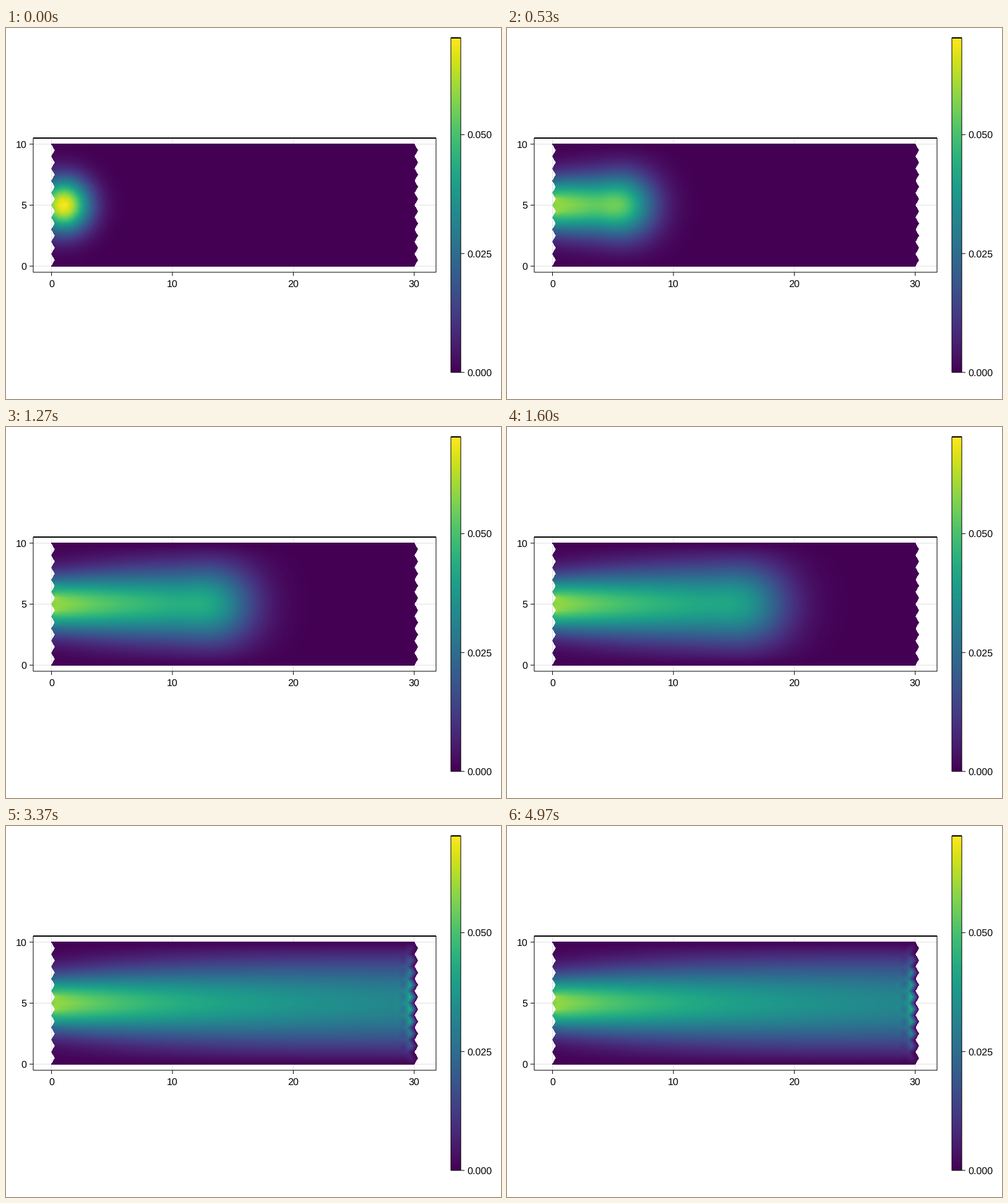
These frames come from a looping animation (800 px wide and 600 px high, 5.01 s). A matplotlib script:

```python
import numpy as np
import matplotlib.pyplot as plt
from matplotlib.animation import FuncAnimation

W, H, DPI = 800, 600, 100
FRAMES, LOOP_MS = 150, 5010
plt.rcParams["font.family"] = "Liberation Sans"
plt.rcParams["text.hinting"] = "none"

# Triangular mesh: odd rows are shifted right by half a cell
NX, NY = 52, 20
DX, DY = 30 / NX, 0.5
SPEED, DIFFUSION, SIGMA = 10.0, 1.0, 1.5

# Pixel layout
LEFT, RIGHT, TOP, BOTTOM = 44, 695, 178, 395
SX = (RIGHT - LEFT) / (1.1 * (30 + DX / 2))
SY = (BOTTOM - TOP) / 11
X0 = LEFT + 0.05 * (30 + DX / 2) * SX
Y0 = BOTTOM - 0.5 * SY
BAR_L, BAR_R, BAR_T, BAR_B = 719, 735, 16, 557
FIELD = (72, 668, 387, 186)


def start():
    j, i = np.mgrid[0:NY + 1, 0:NX + 1]
    x, y = (i + 0.5 * (j % 2)) * DX, j * DY
    r2 = (x - 1) ** 2 + (y - 5) ** 2
    return np.exp(-r2 / (2 * SIGMA ** 2)) / (2 * np.pi * SIGMA ** 2)


def rate(c):
    """Advection and diffusion on the hexagonal stencil, fixed boundary."""
    out = np.zeros_like(c)
    for p in (0, 1):
        first = 2 - p
        mid = c[first:NY:2]
        up, down = c[first + 1:NY + 1:2], c[first - 1:NY - 1:2]
        lo, hi = slice(p, p + NX - 1), slice(p + 1, p + NX)
        west, here, east = mid[:, :-2], mid[:, 1:-1], mid[:, 2:]
        nw, ne, sw, se = up[:, lo], up[:, hi], down[:, lo], down[:, hi]
        grad = (2 * (east - west) + ne - nw + se - sw) / (6 * DX)
        lap = (east + west + ne + nw + se + sw - 6 * here) / (1.5 * DX ** 2)
        out[first:NY:2, 1:-1] = DIFFUSION * lap - SPEED * grad
    return out


def solve(substeps=5):
    dt = LOOP_MS / 1000 / FRAMES / substeps
    c = start()
    states = [c]
    for _ in range(FRAMES - 1):
        for _ in range(substeps):
            k1 = rate(c)
            k2 = rate(c + dt / 2 * k1)
            k3 = rate(c + dt / 2 * k2)
            k4 = rate(c + dt * k3)
            c = c + dt / 6 * (k1 + 2 * k2 + 2 * k3 + k4)
        states.append(c)
    return np.array(states)


def add_flicker(states, amount=0.07):
    """Unsteady ripple in the last free nodes before the outlet."""
    rng = np.random.default_rng(4)
    half = rng.uniform(-amount, amount, (FRAMES, NY // 4))
    states[:, 1::2, NX - 1] *= 1 + np.hstack([half, half[:, ::-1]])


def sampler():
    """Node indices and weights of the triangle under each pixel."""
    x = (np.arange(FIELD[0], FIELD[1]) + 0.5 - X0) / SX
    y = (Y0 - np.arange(FIELD[3], FIELD[2]) - 0.5) / SY
    x, r = np.meshgrid(x, y / DY)
    # Pixels touched by the rim count as inside
    pad_r, pad_p = 0.5 / (SY * DY), 0.5 / (SX * DX)
    inside = (r >= -pad_r) & (r <= NY + pad_r)
    r = np.clip(r, 0, NY - 1e-9)
    even = 2 * ((r + 1) // 2).astype(int)
    odd = 2 * (r // 2).astype(int) + 1
    f = np.abs(r - even)
    p = x / DX - f / 2
    inside &= (p >= -pad_p) & (p <= NX + pad_p)
    p = np.clip(p, 0, NX - 1e-9)
    i = p.astype(int)
    g = p - i
    low = g + f <= 1
    nodes = [
        (np.where(low, even, odd), np.where(low, i, i + 1), np.abs(1 - g - f)),
        (even, i + 1, np.where(low, g, 1 - f)),
        (odd, i, np.where(low, f, 1 - g)),
    ]
    return nodes, ~inside


states = solve()
add_flicker(states)
VMAX = states[0].max()
nodes, outside = sampler()


def raster(n):
    c = states[n]
    return np.ma.array(sum(c[j, i] * w for j, i, w in nodes), mask=outside)


fig = plt.figure(figsize=(W / DPI, H / DPI), dpi=DPI, facecolor="white")
ax = fig.add_axes([0, 0, 1, 1])
ax.axis("off")


def line(xs, ys, color="black", z=4):
    ax.plot(xs, ys, color=color, lw=72 / DPI, zorder=z, snap=False,
            solid_capstyle="butt", solid_joinstyle="miter")


def box(l, r, t, b):
    line([l, r, r, l, l, r], [t, t, b, b, t, t])


def label(x, y, text, ha):
    ax.text(x, y + 5.7, text, ha=ha, va="baseline", fontsize=16 * 72 / DPI)


for v in (0, 10, 20, 30):
    x = X0 + v * SX
    line([x, x], [TOP, BOTTOM], "#e0e0e0", 1)
    line([x, x], [BOTTOM, BOTTOM + 6])
    label(x, 413.3, str(v), "center")
for v in (0, 5, 10):
    y = Y0 - v * SY
    line([LEFT, RIGHT], [y, y], "#e0e0e0", 1)
    line([LEFT - 6, LEFT], [y, y])
    label(33.5, y, str(v), "right")
box(LEFT, RIGHT, TOP, BOTTOM)

ramp = np.linspace(1, 0, BAR_B - BAR_T)[:, None]
ax.imshow(ramp, cmap="viridis", aspect="auto", interpolation="nearest",
          extent=(BAR_L, BAR_R, BAR_B, BAR_T), zorder=2)
box(BAR_L, BAR_R, BAR_T, BAR_B)
for v in (0, 0.025, 0.05):
    y = BAR_B - v / VMAX * (BAR_B - BAR_T)
    line([BAR_R, BAR_R + 6], [y, y])
    label(745, y, f"{v:.3f}", "left")

field = ax.imshow(raster(0), cmap="viridis", vmin=0, vmax=VMAX, aspect="auto",
                  interpolation="nearest", extent=FIELD, zorder=2)
ax.set_xlim(0, W)
ax.set_ylim(H, 0)


def update(n):
    # The middle stretch plays at half rate, showing the later of each pair
    if 24 <= n < 76:
        n |= 1
    field.set_data(raster(n))
    return [field]


anim = FuncAnimation(fig, update, frames=FRAMES, interval=LOOP_MS / FRAMES,
                     repeat=True, repeat_delay=0, blit=False)
plt.show()
```
